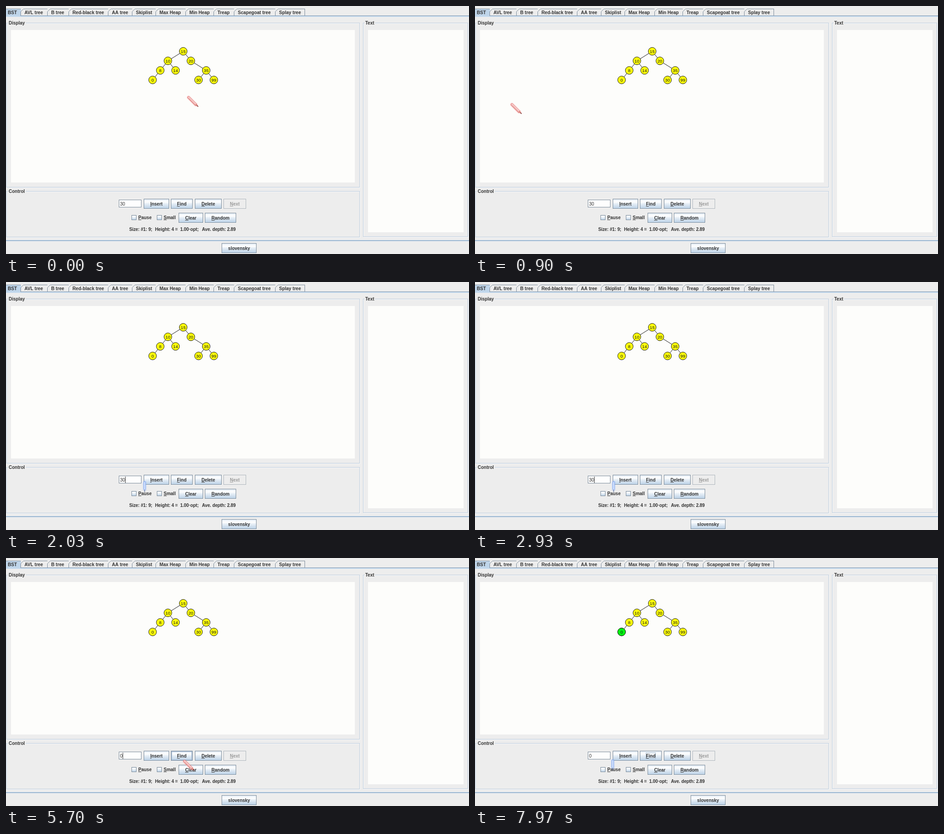
These frames come from a looping animation (1022x548 px, 8 s). An HTML page with a canvas:

```html
<!DOCTYPE html>
<html lang="en">
<head>
<meta charset="utf-8">
<title>Tree search</title>
<style>
html, body { margin: 0; width: 100%; height: 100%; overflow: hidden; background: #ededed; }
canvas { display: block; }
</style>
</head>
<body>
<canvas id="stage" width="1022" height="548"></canvas>
<script>
const LOOP = 8000;
const ctx = document.getElementById('stage').getContext('2d');
const FAMILY = '"Liberation Sans", Arial, sans-serif';
const C = {
  bg: '#ededed', paper: '#fdfdfb', edge: '#7a8a99', soft: '#b8cfe5',
  mid: '#a3b8cc', ink: '#333333', dim: '#9a9a9a', yellow: '#ffff0c', green: '#00ff10'
};

const TABS = ['BST', 'AVL tree', 'B tree', 'Red-black tree', 'AA tree', 'Skiplist',
  'Max Heap', 'Min Heap', 'Treap', 'Scapegoat tree', 'Splay tree'];
const TAB_X = [0, 32, 91, 138, 225, 278, 330, 396, 458, 503, 594, 659];

// key, depth, parent index; keys are listed in order, so the index gives x
const NODES = [[0, 3, 1], [8, 2, 2], [10, 1, 4], [14, 2, 2], [15, 0, -1],
  [20, 1, 4], [30, 3, 7], [35, 2, 5], [99, 3, 7]];
const nodeX = i => 323.6 + 16.9 * i;
const nodeY = i => 100.1 + 21.1 * NODES[i][1];

// time, x, y of the pointer
const POINTER = [[0, 402, 201], [500, 79.5, 215], [830, 80, 216], [1100, 83, 220],
  [1330, 83, 220], [1400, 394, 434], [1530, 394, 434], [1560, 376.5, 433.5],
  [1960, 306, 441], [5370, 306, 441], [5620, 393, 448], [5700, 393, 448],
  [6200, 395, 450], [7040, 394, 450], [7870, 394, 448], [7970, 304, 446]];

// time, x, y of the travelling search node
const SEARCH = [[6210, 36, 56], [6470, nodeX(4), nodeY(4)], [6540, nodeX(4), nodeY(4)],
  [6710, nodeX(2), nodeY(2)], [6800, nodeX(2), nodeY(2)], [7010, nodeX(1), nodeY(1)],
  [7150, nodeX(1), nodeY(1)], [7400, nodeX(0), nodeY(0)]];

const within = (t, a, b) => t >= a && t < b;

function along(path, t, ease = k => k) {
  if (t <= path[0][0]) return path[0].slice(1);
  for (let i = 1; i < path.length; i++) {
    const [t0, x0, y0] = path[i - 1], [t1, x1, y1] = path[i];
    if (t <= t1) {
      const k = ease((t - t0) / (t1 - t0));
      return [x0 + (x1 - x0) * k, y0 + (y1 - y0) * k];
    }
  }
  return path[path.length - 1].slice(1);
}

function fill(x, y, w, h, color) {
  ctx.fillStyle = color;
  ctx.fillRect(x, y, w, h);
}

function frame(x, y, w, h, color, width = 1) {
  ctx.strokeStyle = color;
  ctx.lineWidth = width;
  ctx.strokeRect(x + width / 2, y + width / 2, w - width, h - width);
}

function polyline(points, color, width = 1) {
  ctx.strokeStyle = color;
  ctx.lineWidth = width;
  ctx.beginPath();
  points.forEach(([x, y]) => ctx.lineTo(x, y));
  ctx.stroke();
}

const line = (x0, y0, x1, y1, color, width) => polyline([[x0, y0], [x1, y1]], color, width);

function label(text, x, y, { size = 10, bold = true, color = C.ink, align = 'left', key = false } = {}) {
  ctx.font = `${bold ? 'bold ' : ''}${size}px ${FAMILY}`;
  ctx.textAlign = 'left';
  ctx.fillStyle = color;
  if (align === 'center') x -= ctx.measureText(text).width / 2;
  ctx.fillText(text, x, y);
  if (key) ctx.fillRect(x, y + 1, ctx.measureText(text[0]).width, 1);
}

function sheen(x, y, w, h) {
  const g = ctx.createLinearGradient(0, y, 0, y + h);
  g.addColorStop(0, '#dde8f3');
  g.addColorStop(0.3, '#ffffff');
  g.addColorStop(0.5, '#e6eef6');
  g.addColorStop(1, C.soft);
  fill(x, y, w, h, g);
}

function button(text, x, y, w, { key = true, hover = false, focus = false, down = false, off = false } = {}) {
  const h = 22;
  if (off) fill(x, y, w, h, C.bg);
  else if (down) fill(x, y, w, h, C.soft);
  else sheen(x, y, w, h);
  frame(x, y, w, h, off ? '#adb5bd' : C.edge);
  if (!off) fill(x + 1, y + h, w, 1, '#fafafa');
  if (hover) frame(x + 1, y + 1, w - 2, h - 2, '#a3b8d2', 1.5);
  if (focus) frame(x + w / 2 - 11, y + 4, 22, 14, C.mid);
  label(text, x + w / 2, y + 15, { align: 'center', key, color: off ? C.dim : C.ink });
}

function checkbox(text, x) {
  sheen(x, 462, 11, 11);
  frame(x, 462, 11, 11, C.edge);
  label(text, x + 15, 471, { key: true });
}

function group(title, x, y, w, h) {
  frame(x + 1, y + 1, w, h, '#f7f9fb');
  frame(x, y, w, h, '#bccbdb');
  ctx.font = `bold 10px ${FAMILY}`;
  fill(x + 3, y - 2, ctx.measureText(title).width + 4, 5, C.bg);
  label(title, x + 5, y + 4);
}

// Neighbouring tabs share one slanted edge; only the last has a right side.
function drawTabs() {
  fill(0, 6, 33, 16, '#bfd5ea');
  TABS.forEach((text, i) => {
    const x = TAB_X[i] + 0.5, end = TAB_X[i + 1] + 0.5;
    if (i) polyline([[x, 22], [x, 12.5], [x + 6, 6.5], [end, 6.5]], C.edge);
    else line(0, 6.5, end, 6.5, C.edge);
    label(text, i ? x + 8.2 : 4, 17.5, { size: 10.15 });
  });
  line(659.5, 6, 659.5, 22, C.edge);
  fill(33, 21, 989, 1, '#7f96ad');
  fill(0, 22, 1022, 2, '#c5daee');
}

function drawNode(key, x, y, color) {
  ctx.beginPath();
  ctx.arc(x, y, 8.6, 0, Math.PI * 2);
  ctx.fillStyle = color;
  ctx.fill();
  ctx.strokeStyle = '#111';
  ctx.lineWidth = 1;
  ctx.stroke();
  label(String(key), x, y + 3.8, { size: 9.8, bold: false, color: '#111', align: 'center' });
}

function drawTree(t) {
  ctx.save();
  ctx.beginPath();
  ctx.rect(11, 53, 759, 337);
  ctx.clip();
  NODES.forEach(([, , p], i) => {
    if (p >= 0) line(nodeX(i), nodeY(i), nodeX(p), nodeY(p), '#111');
  });
  NODES.forEach(([key], i) => drawNode(key, nodeX(i), nodeY(i), C.yellow));
  if (t >= 6240) drawNode(0, ...along(SEARCH, t), C.green);
  ctx.restore();
}

function drawField(t) {
  const text = t < 4500 ? '30' : t < 4530 ? '' : '0';
  fill(249, 428, 50, 17, '#fefefe');
  frame(249, 428, 50, 17, C.edge);
  if (within(t, 4070, 4500)) fill(251, 430, 13, 14, C.soft);
  label(text, 251.7, 441, { bold: false });
  const since = t >= 4500 ? 4500 : t >= 4070 ? 4070 : 1900;
  const lit = (t - since) % 1000 < 500;
  if (within(t, 1900, 6200) && lit) fill(252 + text.length * 5.5, 430, 1, 14, C.ink);
}

function drawStatus() {
  ctx.letterSpacing = '-0.12px';
  label('Size: #1: 9;', 272, 497);
  label('Height: 4 =', 329, 497);
  label('1.00·opt;', 384.5, 497);
  label('Ave. depth: 2.89', 432.5, 497);
  ctx.letterSpacing = '0px';
}

function drawControls(t) {
  drawField(t);
  button('Insert', 304, 426, 56);
  button('Find', 364, 426, 48, {
    hover: within(t, 1365, 1640) || within(t, 5520, 7930),
    focus: t >= 6200,
    down: within(t, 6130, 6200)
  });
  button('Delete', 417, 426, 59);
  button('Next', 480, 426, 50, { off: true });
  checkbox('Pause', 277);
  checkbox('Small', 333);
  button('Clear', 381, 457, 54);
  button('Random', 439, 457, 69);
  drawStatus();
}

function drawPencil(x, y) {
  ctx.save();
  ctx.translate(x, y);
  ctx.lineCap = 'round';
  line(1, 1, 17, 17, 'rgba(240,130,130,.22)', 8.5);
  line(1, 1, 16.5, 16.5, '#e78d8d', 5.6);
  line(1.2, 0.8, 16.5, 16, '#f9d3d0', 3);
  line(2, 3, 16, 17, '#e2a09c', 1);
  ctx.beginPath();
  ctx.moveTo(18.6, 14.4);
  ctx.lineTo(22.5, 21.5);
  ctx.lineTo(14.6, 18.4);
  ctx.fillStyle = '#dd8a83';
  ctx.fill();
  line(20.2, 19.4, 21.9, 21, '#7d3430', 1.6);
  ctx.restore();
}

function drawBeam(x, y) {
  ctx.save();
  ctx.lineCap = 'round';
  line(x, y + 2, x, y + 17, 'rgba(120,165,250,.25)', 8);
  line(x, y + 2, x, y + 16, '#8fb2f2', 5);
  line(x, y + 2, x, y + 17, '#d6e4fd', 2.6);
  line(x, y + 18, x, y + 23, '#5c6f96', 1.2);
  ctx.restore();
}

function draw(t) {
  fill(0, 0, 1022, 548, C.bg);
  drawTabs();
  group('Display', 1, 37, 780, 364);
  group('Control', 1, 409, 780, 102);
  group('Text', 788, 37, 232, 473);
  fill(11, 53, 759, 337, C.paper);
  fill(799, 53, 211, 447, C.paper);
  drawTree(t);
  drawControls(t);
  fill(0, 517, 1022, 1, '#c3d8ec');
  fill(0, 518, 1022, 1, '#7f9dba');
  fill(0, 519, 1022, 1, '#d3e2f0');
  button('slovensky', 476, 524, 77, { key: false });

  const smooth = k => k * k * (3 - 2 * k);
  const [x, y] = along(POINTER, t, smooth);
  const overField = within(t, 1820, 5470) || t >= 7935;
  (overField ? drawBeam : drawPencil)(x, y);
}

const start = performance.now();
function tick() {
  draw((performance.now() - start) % LOOP);
  requestAnimationFrame(tick);
}
tick();
</script>
</body>
</html>
```
